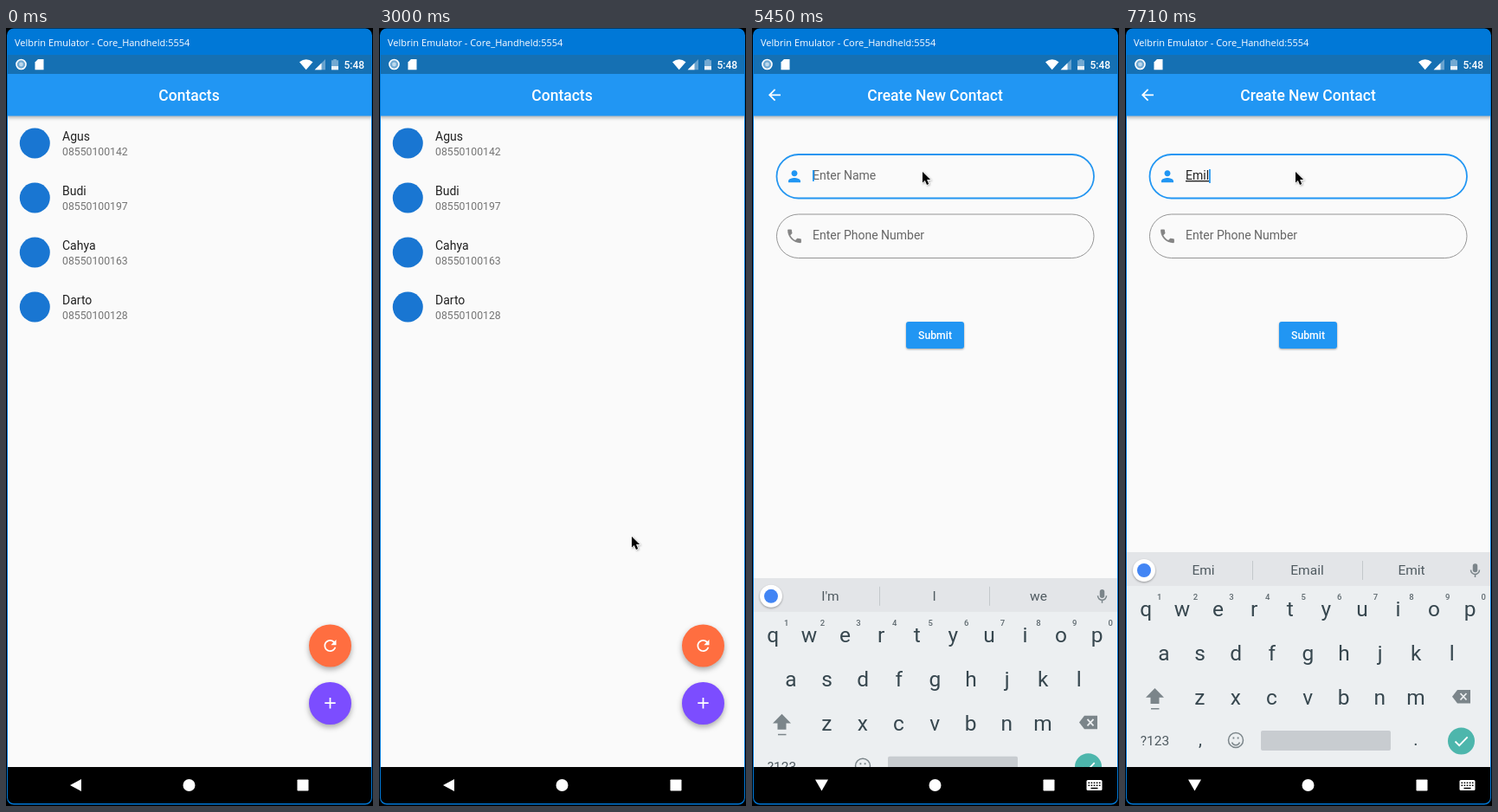
An HTML page that plays this animation: 424x898 px, repeating every 8000 ms.

```html
<!DOCTYPE html>
<html lang="en">
<head>
<meta charset="utf-8">
<title>Contacts demo</title>
<style>
  html, body { margin: 0; width: 100%; height: 100%; overflow: hidden; background: #000; }
  svg { display: block; width: 424px; height: 898px; font-family: Roboto, sans-serif; }
  .mid { text-anchor: middle; }
  .white { fill: #fff; }
  .window-title { font: 11px "Open Sans", "Noto Sans", sans-serif; }
  .bar-title { font-size: 17.5px; font-weight: 500; }
  .clock, .button { font-weight: 500; }
  .clock { font-size: 12px; }
  .button { font-size: 12.25px; }
  .name, .value { font-size: 14px; fill: #212121; }
  .number { font-size: 12.25px; fill: #757575; }
  .hint { font-size: 14px; fill: #666; }
  .value { text-decoration: underline; }
  .icon { fill: #858585; }
  .field { fill: none; stroke: #949494; }
  .bar { filter: drop-shadow(0 2px 2px rgba(0, 0, 0, .3)); }
  .fab { filter: drop-shadow(0 3px 3px rgba(0, 0, 0, .32)); }
  .raised { filter: drop-shadow(0 1px 1px rgba(0, 0, 0, .35)); }
  .word { font-size: 15.5px; fill: #4f5a60; }
  .key { font-size: 24.5px; fill: #37474f; }
  .digit { font-size: 9.5px; font-weight: 500; fill: #5f6a70; }
  .caps .key { text-transform: uppercase; }
  .caps #shift { fill: #37474f; }
  .gray { fill: #7b858a; }

  #list, #form, #active, #person, #board, #idleNav, #typeNav, #cursor {
    animation: 8s linear infinite;
  }
  #list { animation-name: leave; }
  #form { animation-name: enter; }
  #active { animation-name: focus; }
  #person { animation-name: tint; }
  #board { animation-name: rise; }
  #idleNav { animation-name: idle; }
  #typeNav { animation-name: typing; }
  #cursor { animation-name: travel; }

  @keyframes leave { 0%, 50.5% { opacity: 1 } 52%, 100% { opacity: 0 } }
  @keyframes enter { 0%, 50.5% { opacity: 0 } 52%, 100% { opacity: 1 } }
  @keyframes focus {
    0%, 66.1% { stroke: #949494; stroke-width: 1px }
    66.625% { stroke: #5885aa; stroke-width: 1.3px }
    68.2%, 100% { stroke: #2196f3; stroke-width: 1.8px }
  }
  @keyframes tint { 0%, 66.1% { fill: #858585 } 66.15%, 100% { fill: #2196f3 } }
  @keyframes rise {
    0%, 66.9% { transform: translateY(250px); animation-timing-function: cubic-bezier(0, 0, .2, 1) }
    69.1%, 100% { transform: none }
  }
  @keyframes idle { 0%, 66.12% { opacity: 1 } 66.13%, 100% { opacity: 0 } }
  @keyframes typing { 0%, 66.12% { opacity: 0 } 66.13%, 100% { opacity: 1 } }
  @keyframes travel {
    0%, 1.8% { transform: translate(224px, -24px) }
    6.125%, 8.3% { transform: translate(192px, 8px) }
    9%, 11.6% { transform: translate(188px, 2px) }
    14.4% { transform: translate(238px, 140px) }
    16.3% { transform: translate(285px, 250px) }
    18% { transform: translate(318px, 400px) }
    19.8% { transform: translate(331px, 600px) }
    21.5% { transform: translate(337px, 742px) }
    22%, 22.5% { transform: translate(337px, 744px) }
    24.5% { transform: translate(352px, 770px) }
    27.5% { transform: translate(334px, 750px) }
    29.75% { transform: translate(340px, 732px) }
    31.625% { transform: translate(345px, 741px) }
    33.25%, 35.5% { transform: translate(349px, 711px) }
    37.4%, 38% { transform: translate(292px, 587px) }
    41.25% { transform: translate(330px, 690px) }
    44.1%, 46.2% { transform: translate(368px, 777px) }
    47%, 52.3% { transform: translate(366px, 775px); animation-timing-function: ease-in }
    56.3% { transform: translate(290px, 480px); animation-timing-function: ease-out }
    60.4% { transform: translate(187px, 177px) }
    62.5% { transform: translate(190px, 157px) }
    64%, 100% { transform: translate(197px, 166px) }
  }
</style>
</head>
<body>
<svg viewBox="0 0 424 898">
  <defs>
    <clipPath id="frame"><rect x="2" y="1" width="420" height="894" rx="7"/></clipPath>
    <clipPath id="screen"><rect x="2" y="101" width="420" height="752"/></clipPath>
  </defs>
  <rect x="1" y=".5" width="422" height="896" rx="8" fill="#0078d7"/>
  <g clip-path="url(#frame)">
    <rect x="2" y="1" width="420" height="30" fill="#0078d7"/>
    <text class="window-title white" x="10" y="21">Velbrin Emulator - Core_Handheld:5554</text>
    <rect x="2" y="101" width="420" height="752" fill="#fafafa"/>
    <rect class="bar" x="0" y="53" width="424" height="48.5" fill="#2196f3"/>
    <rect x="2" y="31" width="420" height="22" fill="#1570b3"/>

    <g class="white">
      <circle cx="17.5" cy="42" r="5.5" fill="#6fa9d2" stroke="#fff" stroke-width="1.6"/>
      <circle cx="17.5" cy="42" r="2.4" fill="#bcd8ec"/>
      <path d="M37 36h6.500v12.300h-10v-8.800z"/>
      <path d="M339 39.300Q346.700 33 354.500 39.300L346.700 48.300z"/>
      <path d="M369 36v12.300h-12.300z" opacity=".35"/>
      <path d="M364.500 40.500v7.800h-7.800z"/>
      <path d="M376 37.300h2.200v-1.300h3.600v1.300h2.200v11h-8z" opacity=".4"/>
      <path d="M376 44h8v4.300h-8z" opacity=".85"/>
      <text class="clock" x="390.500" y="46.500">5:48</text>
    </g>

    <g id="list">
      <text class="bar-title white mid" x="211.500" y="84">Contacts</text>
      <g id="people"></g>
      <circle class="fab" cx="374.500" cy="713" r="24.500" fill="#ff6e40"/>
      <path class="white" transform="translate(364 702.500) scale(.875)" d="M17.650 6.350C16.200 4.900 14.210 4 12 4c-4.420 0-7.990 3.580-7.990 8s3.570 8 7.990 8c3.730 0 6.840-2.550 7.730-6h-2.080c-.82 2.330-3.040 4-5.650 4-3.310 0-6-2.690-6-6s2.690-6 6-6c1.660 0 3.140.69 4.220 1.780L13 11h7V4z"/>
      <circle class="fab" cx="374.500" cy="779.500" r="24.500" fill="#7c4dff"/>
      <path d="M368.300 779.200h12.400M374.500 773v12.400" stroke="#fff" stroke-width="1.750"/>
    </g>

    <g id="form">
      <path class="white" transform="translate(15.500 66.800) scale(.875)" d="M20 11H7.830l5.590-5.590L12 4l-8 8 8 8 1.410-1.410L7.830 13H20z"/>
      <text class="bar-title white mid" x="211.500" y="84">Create New Contact</text>
      <rect class="field" id="active" x="28.500" y="146" width="366.500" height="50.500" rx="25.250"/>
      <rect class="field" x="28.500" y="215" width="366.500" height="50.500" rx="25.250"/>
      <path class="icon" id="person" transform="translate(38.500 160.800) scale(.875)" d="M12 12c2.210 0 4-1.790 4-4s-1.790-4-4-4-4 1.790-4 4 1.790 4 4 4zm0 2c-2.670 0-8 1.340-8 4v2h16v-2c0-2.660-5.330-4-8-4z"/>
      <path class="icon" transform="translate(38.500 229.800) scale(.875)" d="M6.620 10.790c1.440 2.830 3.760 5.140 6.590 6.590l2.200-2.200c.27-.27.67-.36 1.020-.24 1.120.37 2.330.57 3.570.57.55 0 1 .45 1 1V20c0 .55-.45 1-1 1C10.610 21 3 13.390 3 4c0-.55.45-1 1-1h3.500c.55 0 1 .45 1 1 0 1.250.2 2.450.57 3.570.11.35.03.74-.25 1.020z"/>
      <text class="hint" id="hint" x="70" y="175">Enter Name</text>
      <text class="value" id="value" x="70" y="175"></text>
      <rect id="caret" x="70" y="163" width="1.750" height="16" fill="#2196f3"/>
      <text class="hint" x="70" y="244">Enter Phone Number</text>
      <rect class="raised" x="178" y="339" width="67" height="31" rx="3" fill="#2196f3"/>
      <text class="button white mid" x="211.500" y="359">Submit</text>
    </g>

    <g clip-path="url(#screen)">
      <g id="board">
        <rect x="2" y="605" width="420" height="248" fill="#eceff1"/>
        <rect x="2" y="605" width="420" height="39" fill="#e3e5e8"/>
        <circle class="raised white" cx="22" cy="626" r="13"/>
        <circle cx="22" cy="626" r="8" fill="#4285f4"/>
        <path d="M147.500 615v22M274.500 615v22" stroke="#c3c8cb"/>
        <g id="words"></g>
        <g fill="none" stroke="#7b858a" stroke-width="1.500">
          <rect x="402.500" y="619" width="4" height="8.500" rx="2" fill="#7b858a"/>
          <path d="M399.500 625.500a5 5 0 0 0 10 0M404.500 630.500v3.500"/>
          <circle cx="128" cy="822" r="8.500"/>
          <path d="M123.500 824.500a4.800 4.800 0 0 0 9 0"/>
          <path d="M124.500 819.500h1.800M129.700 819.500h1.800" stroke-width="2"/>
        </g>
        <path class="gray" id="shift" d="M34.500 762l10.500 10.800h-5.500v7.200h-10v-7.200h-5.500z"/>
        <path class="gray" d="M30 785h9.500v1.500h-9.500z"/>
        <path class="gray" d="M384 764h15v15.500h-15l-6-7.750z"/>
        <path d="M387.500 768l7 7.500m0-7.500l-7 7.500" stroke="#eceff1" stroke-width="1.800"/>
        <text class="word mid" x="34.500" y="828">?123</text>
        <text class="key mid" x="87" y="828" style="font-size:20px">,</text>
        <rect x="157" y="811" width="150" height="23" rx="2" fill="#c8ccd0"/>
        <text class="key mid" x="336" y="828" style="font-size:20px">.</text>
        <circle cx="388.500" cy="823" r="15.500" fill="#4db6ac"/>
        <path d="M381.500 823.500l4.700 4.700 9.500-9.800" fill="none" stroke="#fff" stroke-width="1.800"/>
        <g id="keys"></g>
      </g>
    </g>

    <rect x="2" y="853" width="420" height="43" fill="#000"/>
    <g class="white">
      <circle cx="211.500" cy="874" r="7"/>
      <rect x="336.500" y="867.500" width="13" height="13" rx=".8"/>
      <path id="idleNav" d="M74 874l13-7v14z"/>
      <g id="typeNav">
        <path d="M73 867.500h15l-7.500 13z"/>
        <rect x="386.500" y="868" width="18" height="12" rx="1.500"/>
        <path d="M388.500 871.200h14M388.500 874.200h14" stroke="#000" stroke-width="1.600" stroke-dasharray="1.600 1.500"/>
        <path d="M391.500 877.500h8" stroke="#000" stroke-width="1.500"/>
      </g>
    </g>
  </g>
  <g id="cursor">
    <path d="M0 0v12.500l2.900-2.600 2.100 5 2.200-.9-2.100-4.900h4z" fill="#000" stroke="#fff" stroke-width="1.200" paint-order="stroke" style="filter:drop-shadow(1px 1px 1px rgba(0,0,0,.3))"/>
  </g>
</svg>
<script>
  const $ = id => document.getElementById(id);

  function add(parent, tag, attrs, text = '') {
    const el = document.createElementNS('http://www.w3.org/2000/svg', tag);
    for (const [k, v] of Object.entries(attrs)) el.setAttribute(k, v);
    el.textContent = text;
    return parent.appendChild(el);
  }

  const people = [
    ['Agus', '08550100142'], ['Budi', '08550100197'],
    ['Cahya', '08550100163'], ['Darto', '08550100128']
  ];
  people.forEach(([name, number], i) => {
    const y = 133 + i * 63;
    add($('people'), 'circle', { cx: 33.3, cy: y, r: 17.5, fill: '#1976d2' });
    add($('people'), 'text', { class: 'name', x: 65, y: y - 3.5 }, name);
    add($('people'), 'text', { class: 'number', x: 65, y: y + 14 }, number);
  });

  const rows = [['qwertyuiop', 24.3, 679], ['asdfghjkl', 45, 730], ['zxcvbnm', 86.3, 781]];
  rows.forEach(([letters, x0, y], row) => [...letters].forEach((letter, i) => {
    const x = x0 + i * 41.6;
    add($('keys'), 'text', { class: 'key mid', x, y }, letter);
    if (!row) add($('keys'), 'text', { class: 'digit mid', x: x + 15.5, y: 660 }, (i + 1) % 10);
  }));

  const slots = [90.5, 210.5, 331].map(x => add($('words'), 'text', { class: 'word mid', x, y: 631 }));

  // Each entry: start time in ms, then the state from there on.
  const typed = [[0, ''], [6640, 'E'], [7270, 'Em'], [7530, 'Emi'], [7640, 'Emil']];
  const guesses = [
    [0, ["I'm", 'I', 'we']], [6720, ['E', 'Email', 'Eat']],
    [7350, ['Em', 'Email', 'Emu']], [7580, ['Emi', 'Email', 'Emit']],
    [7710, ['Emil', 'Email', 'Emi']]
  ];
  const blink = [[0, 0], [5290, 1], [5710, 0], [6200, 1], [7070, 0], [7270, 1]];
  const at = (list, t) => list.filter(([start]) => start <= t).pop()[1];
  const clock = $('cursor').getAnimations()[0];

  function draw() {
    const t = (clock.currentTime || 0) % 8000;
    const text = at(typed, t);
    $('value').textContent = text;
    $('hint').style.opacity = text ? 0 : 1;
    $('caret').style.opacity = at(blink, t);
    $('caret').setAttribute('x', 70 + (text ? $('value').getComputedTextLength() : 0));
    $('caret').setAttribute('y', text ? 163 : 164);
    $('caret').setAttribute('height', text ? 16 : 13);
    at(guesses, t).forEach((word, i) => { slots[i].textContent = word; });
    $('board').classList.toggle('caps', t >= 6460 && t < 6500);
    requestAnimationFrame(draw);
  }
  draw();
</script>
</body>
</html>
```
